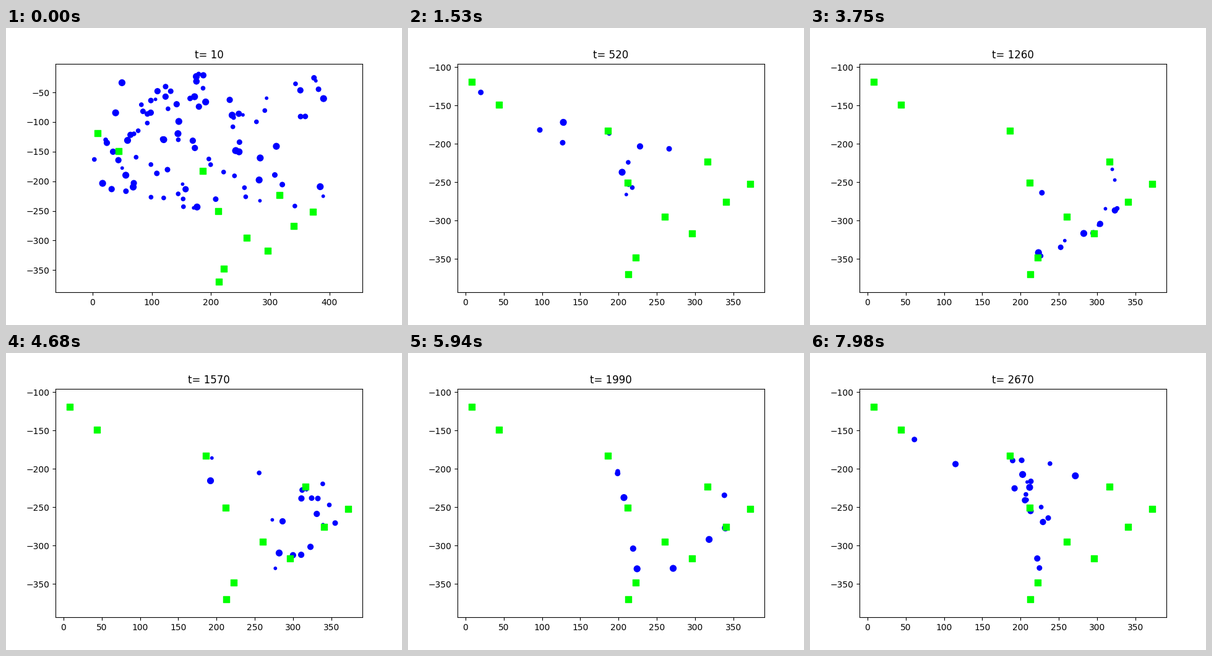
A matplotlib script for the animation above (8000 ms loop, 640x480 px).

```python
import numpy as np
import matplotlib.pyplot as plt
from matplotlib.animation import FuncAnimation

STEPS = 267
SPEED = 4.2                  # data units per step
CROWD = 98
JOURNEYS = 200
WIDTH, HEIGHT = 496, 369.6   # axes size in pixels

STOPS = np.array([
    (8, -119), (44, -149), (186, -183), (212, -251), (316, -223), (372, -252),
    (340, -276), (260, -295), (296, -317), (222, -348), (213, -370)])

# The busiest area drifts through these points
BUSY_STEP = [51, 125, 156, 198, 235, 266]
BUSY_X = [140, 320, 310, 270, 225, 160]
BUSY_Y = [-190, -300, -245, -290, -265, -200]

rng = np.random.default_rng(8)


def length(v):
    return np.hypot(v[..., 0], v[..., 1])


def nearest(point):
    """Stops sorted by distance from a point."""
    return STOPS[np.argsort(length(STOPS - point))]


def spread(n, low, high):
    """Random values that fill the range from low to high exactly."""
    u = rng.random(n)
    return low + (high - low) * (u - u.min()) / np.ptp(u)


def trip(begin, speed, *points):
    """Times and places of a walk at constant speed."""
    points = np.array(points)
    legs = length(np.diff(points, axis=0)) / speed
    return begin + np.append(0, np.cumsum(legs)), points, 10 * rng.integers(1, 6)


def settle(start):
    """Walk from the opening position to the nearest stop."""
    return trip(0, SPEED * rng.uniform(1, 1.2), start, nearest(start)[0])


def journey(middle):
    """Hop between neighbouring stops of the busy area, half way at middle."""
    busy = [np.interp(middle, BUSY_STEP, axis) for axis in (BUSY_X, BUSY_Y)]
    a = nearest(rng.normal(busy, 55))[0]
    b = rng.choice(nearest(a)[1:4])
    via = (a + b) / 2 + rng.normal(0, 6, 2)
    return trip(middle - length(via - a) / SPEED, SPEED, a, via, b)


def place(walk, step):
    times, points, _ = walk
    return [np.interp(step, times, axis) for axis in points.T]


def walking(walks, step):
    return [w for w in walks if w[0][0] <= step <= w[0][-1]]


starts = np.column_stack([spread(CROWD, 3, 390), spread(CROWD, -245, -19)])
settlers = [settle(start) for start in starts]
travellers = [journey(middle) for middle in rng.uniform(45, 285, JOURNEYS)]

fig, ax = plt.subplots(figsize=(6.4, 4.8), dpi=100)
dots = ax.scatter([], [], color="#0000ff")
ax.scatter(*STOPS.T, s=50, marker="s", color="#00ff00")
title = ax.set_title("")


def fit_view(points):
    """Equal scale on both axes with 5% margins."""
    low, high = points.min(axis=0), points.max(axis=0)
    x, y = (low + high) / 2
    unit = max(1.1 * (high - low) / (WIDTH, HEIGHT))
    ax.set_xlim(x - unit * WIDTH / 2, x + unit * WIDTH / 2)
    ax.set_ylim(y - unit * HEIGHT / 2, y + unit * HEIGHT / 2)


def draw(step):
    walks = walking(settlers, step)
    crowd = [place(w, step) for w in walks]
    fit_view(np.vstack([STOPS, *crowd]))
    walks += walking(travellers, step)
    places = [place(w, step) for w in walks]
    dots.set_offsets(np.reshape(places, (-1, 2)))
    dots.set_sizes([size for _, _, size in walks])
    title.set_text(f"t= {10 * (step + 1)}")
    return dots, title


anim = FuncAnimation(fig, draw, frames=STEPS, interval=30, repeat=True,
                     repeat_delay=0, blit=False)
plt.show()
```
